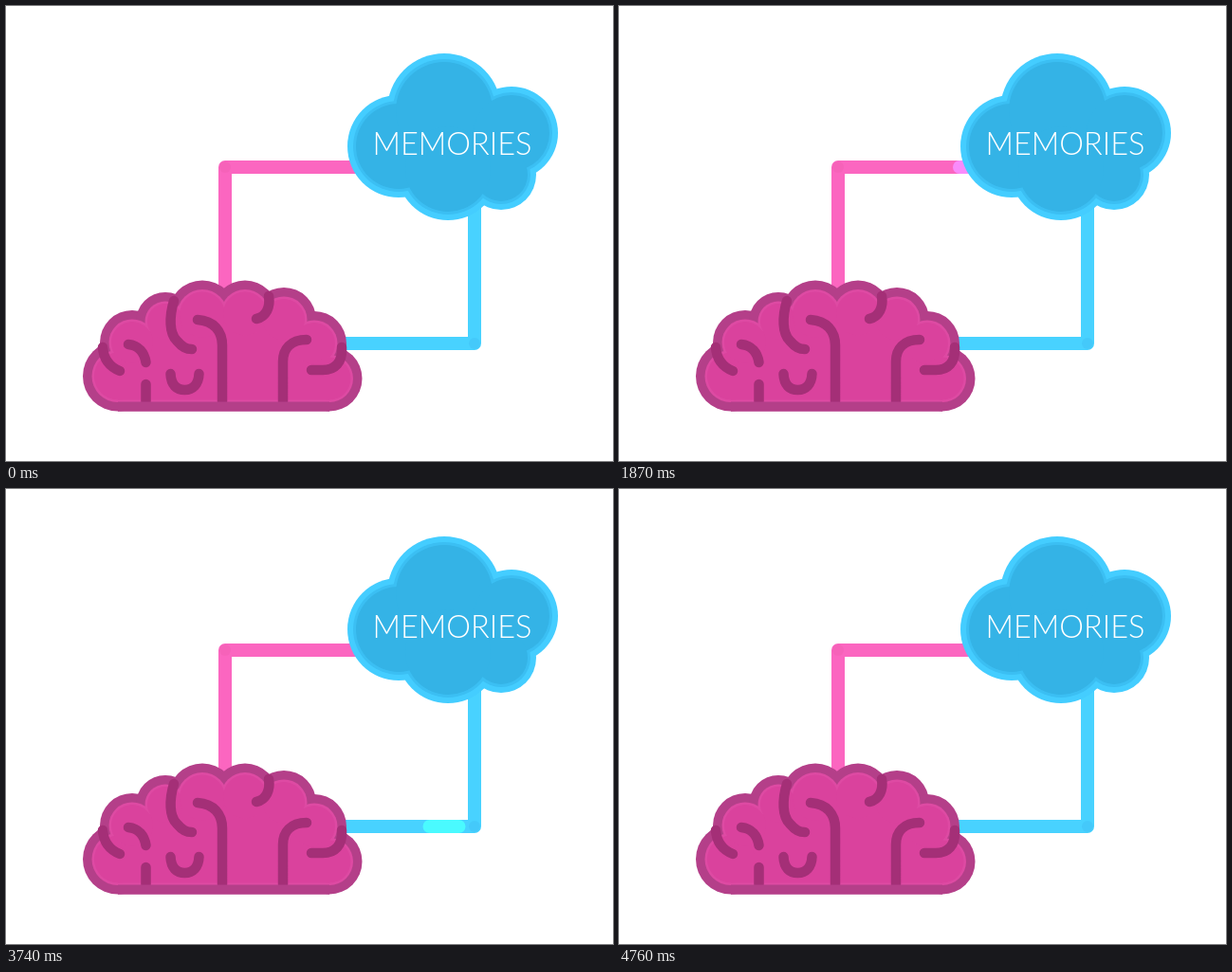
Animation, 640 px wide and 480 px high, one loop 4.93 s. Source, as an HTML page with a canvas:

```html
<!DOCTYPE html>
<html lang="en">
<head>
<meta charset="utf-8">
<title>Memories</title>
<style>
html, body { margin: 0; width: 100%; height: 100%; overflow: hidden; background: #fff; }
canvas { display: block; }
</style>
</head>
<body>
<canvas id="stage" width="640" height="480"></canvas>
<script>
const ctx = document.getElementById('stage').getContext('2d');
const STEP_MS = 170;
const STEPS = 29;

// Lobes as [x, y, radius]
const cloudLobes = [
  [414, 148, 54], [462, 110, 60], [533, 134, 49], [522, 178, 37], [466, 172, 54]
];
const brainLobes = [
  [118, 390.5, 37], [133, 355, 34], [168, 333, 31], [207, 325.5, 36],
  [252, 324.5, 35], [293, 331, 34], [325, 356, 34], [341, 393, 34.5]
];
const grooves = new Path2D(`
  M102 360 C103 374 110 381 120 385
  M129 357 C140 358 146 366 147.5 376
  M147.5 399 V417
  M173.5 388 C174 400 180 405 188.5 405 S203 399 203.5 388
  M177 311 C172 328 172 345 180 353 C186 360 190 362 196 362
  M202 331 C219 332 228 343 228 358 V417
  M277 306 C279 318 274 328 264 330
  M317 352 C300 352 292 362 292 375 V417
  M322 384 H334 C347 384 355 376 354 360`);

const pinkWire = {
  path: new Path2D('M231 330 V170 H420'), color: '#fb66c0', joint: [231, 170, '#f662b9'],
  pulse: { color: '#f98bfb', length: 39, first: 1, last: 11, start: 30.5, speed: 27 }
};
const blueWire = {
  path: new Path2D('M494 150 V356 H300'), color: '#48d2ff', joint: [494, 356, '#44c9fa'],
  pulse: { color: '#4afaff', length: 45, first: 16, last: 25, start: 52, speed: 31 }
};

const cloudColors = {
  rest: ['#44cdff', '#3bbff3', '#34b3e6'],
  lit: ['#45cfff', '#3cc7fe', '#36c1fb']
};
const brainColors = {
  rest: { rim: '#b43f89', body: '#da429d', edge: '#de4aa3', groove: '#a42f77' },
  lit: { rim: '#f55db7', body: '#fb63cb', edge: '#fd68cf', groove: '#e54cab' }
};

function fillLobes(lobes, inset, color) {
  ctx.fillStyle = color;
  ctx.beginPath();
  lobes.forEach(([x, y]) => ctx.lineTo(x, y));
  ctx.fill();
  for (const [x, y, r] of lobes) {
    ctx.beginPath();
    ctx.arc(x, y, r - inset, 0, Math.PI * 2);
    ctx.fill();
  }
}

function strokePath(path, width, color) {
  ctx.lineWidth = width;
  ctx.strokeStyle = color;
  ctx.stroke(path);
}

function drawWire({ path, color, joint, pulse }, step) {
  ctx.lineCap = ctx.lineJoin = 'round';
  strokePath(path, 14, color);
  const [x, y, jointColor] = joint;
  ctx.fillStyle = jointColor;
  ctx.beginPath();
  ctx.arc(x, y, 6, 0, Math.PI * 2);
  ctx.fill();

  if (step < pulse.first || step > pulse.last) return;
  const dash = pulse.length - 14;
  const center = pulse.start + (step - pulse.first) * pulse.speed;
  ctx.setLineDash([dash, 1000]);
  ctx.lineDashOffset = dash / 2 - center;
  strokePath(path, 14, pulse.color);
  ctx.setLineDash([]);
}

function fillBrain(inset, color) {
  fillLobes(brainLobes, inset, color);
  ctx.fillRect(118, 385, 223, 42.5 - inset);
}

function drawBrain({ rim, body, edge, groove }) {
  fillBrain(0, rim);
  fillBrain(9.5, edge);
  fillBrain(12, body);
  strokePath(grooves, 10.5, groove);
  // Keeps the lower rim clear of the round groove ends
  ctx.fillStyle = rim;
  ctx.fillRect(118, 417.5, 223, 10);
}

function drawCloud(colors) {
  [0, 6, 9].forEach((inset, i) => fillLobes(cloudLobes, inset, colors[i]));
  ctx.font = '300 32.5px Lato, sans-serif';
  ctx.textAlign = 'center';
  ctx.textBaseline = 'alphabetic';
  ctx.fillStyle = '#fff';
  ctx.fillText('MEMORIES', 470.5, 156.5);
}

function draw() {
  const step = Math.floor(performance.now() / STEP_MS) % STEPS;
  const cloudLit = step === 12 || step === 13;
  const brainLit = step === 26 || step === 27;

  ctx.fillStyle = '#fff';
  ctx.fillRect(0, 0, 640, 480);
  drawWire(pinkWire, step);
  drawWire(blueWire, step);
  drawBrain(brainLit ? brainColors.lit : brainColors.rest);
  drawCloud(cloudLit ? cloudColors.lit : cloudColors.rest);
  requestAnimationFrame(draw);
}

draw();
</script>
</body>
</html>
```
